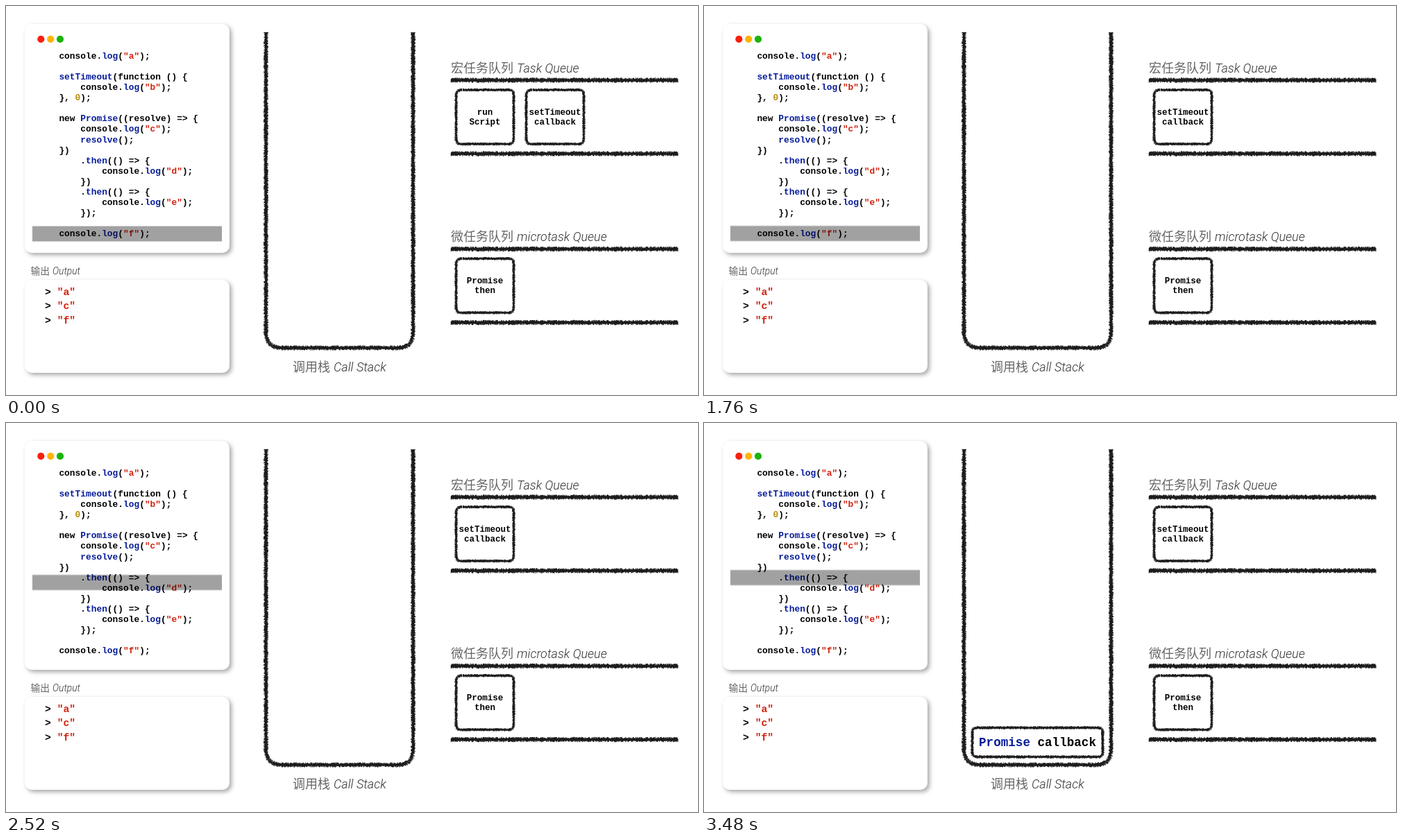
Recreate the animation shown at these times as an HTML page. Size 997 px wide and 561 px high, loop 3960 ms.

```html
<!DOCTYPE html>
<html lang="zh-CN">
<head>
<meta charset="utf-8">
<title>Event loop</title>
<style>
  html, body { margin: 0; width: 100%; height: 100%; overflow: hidden; background: #fff; }
  .stage { position: relative; width: 997px; height: 561px; overflow: hidden; }
  svg { position: absolute; left: 0; top: 0; }

  .panel {
    position: absolute; left: 27px; width: 295px; border-radius: 10px; background: #fff;
    box-shadow: 3px 3px 6px rgba(0, 0, 0, .35);
  }
  .code { top: 26px; height: 330px; }
  .output { top: 395px; height: 134px; }

  pre, .mono { font-family: "Liberation Mono", "Courier New", monospace; font-weight: 700; }
  pre { position: absolute; margin: 0; color: #000; }
  .code pre { left: 49.4px; top: 39px; font-size: 12.87px; line-height: 15.06px; }
  .output pre { left: 29px; top: 7.5px; font-size: 14.7px; line-height: 20.8px; }
  b { color: #061c98; }
  i { color: #d3200b; font-style: normal; }
  u { color: #b68d0c; text-decoration: none; }

  .mono { font-size: 12.5px; text-anchor: middle; }
  .call { font-size: 17.6px; }
  .call tspan { fill: #061c98; }
  .label { font: 300 18px "Noto Sans CJK SC", "Noto Sans CJK", sans-serif; fill: #666; }
  .label tspan { font-family: Roboto, "Liberation Sans", sans-serif; font-style: italic; fill: #333; }
  .label.small { font-size: 13.8px; }
  .rough { fill: none; stroke: #000; stroke-width: .9; }

  /* Paused: the script sets the time of every animation. */
  .run { animation: leave 490ms ease-in 480ms both paused; }
  .timer { animation: advance 490ms cubic-bezier(.37, 0, .63, 1) 480ms both paused; }
  .cursor { animation: climb 960ms cubic-bezier(.37, 0, .63, 1) 1720ms both paused; }
  .frame { animation: drop 500ms ease-out 2980ms both paused; }
  @keyframes leave { to { transform: translateX(-735px); } }
  @keyframes advance { from { transform: translateX(101px); } }
  @keyframes climb { to { transform: translateY(-105.5px); } }
  @keyframes drop { from { transform: translateY(-490px); } }
</style>
</head>
<body>
<div class="stage">
  <div class="panel code"><pre>console.<b>log</b>(<i>"a"</i>);

<b>setTimeout</b>(function () {
    console.<b>log</b>(<i>"b"</i>);
}, <u>0</u>);

new <b>Promise</b>((resolve) =&gt; {
    console.<b>log</b>(<i>"c"</i>);
    <b>resolve</b>();
})
    .<b>then</b>(() =&gt; {
        console.<b>log</b>(<i>"d"</i>);
    })
    .<b>then</b>(() =&gt; {
        console.<b>log</b>(<i>"e"</i>);
    });

console.<b>log</b>(<i>"f"</i>);</pre></div>
  <div class="panel output"><pre>&gt; <i>"a"</i>
&gt; <i>"c"</i>
&gt; <i>"f"</i></pre></div>

  <svg width="997" height="561" viewBox="0 0 997 561">
    <defs>
      <path id="rail" class="rough" data-width="5.4" d="M641 0H968.5"/>
      <path id="tile" class="rough" data-width="3.4" d="M658 121H725Q731.5 121 731.5 128V192Q731.5 199 725 199H655Q648.5 199 648.5 192V128Q648.5 121 657 121"/>
    </defs>

    <circle cx="50.3" cy="47.8" r="5.1" fill="#f7200e"/>
    <circle cx="64.2" cy="47.8" r="5.1" fill="#ffb400"/>
    <circle cx="78" cy="47.8" r="5.1" fill="#1bb40a"/>
    <rect class="cursor" x="38" y="317.5" width="273" height="22" fill-opacity=".37"/>

    <text class="label small" x="35.5" y="387.3">输出<tspan x="67">Output</tspan></text>
    <text class="label" x="413" y="526.7">调用栈<tspan x="472">Call Stack</tspan></text>
    <text class="label" x="641" y="95.5">宏任务队列<tspan x="736">Task Queue</tspan></text>
    <text class="label" x="641" y="339">微任务队列<tspan x="736">microtask Queue</tspan></text>

    <path class="rough" data-width="5.2" d="M374.5 38V470Q374.5 493 397 493H564Q586.5 493 586.5 470V38"/>
    <use href="#rail" y="107"/>
    <use href="#rail" y="213"/>
    <use href="#rail" y="350.5"/>
    <use href="#rail" y="456.5"/>

    <g class="mono">
      <use href="#tile" y="243.3"/>
      <text x="690" y="400.3">Promise</text><text x="690" y="414.3">then</text>
    </g>
    <g class="mono timer">
      <use href="#tile"/>
      <text x="690" y="157">setTimeout</text><text x="690" y="171">callback</text>
    </g>
    <g class="mono run">
      <use href="#tile"/>
      <text x="690" y="157">run</text><text x="690" y="171">Script</text>
    </g>
    <g class="mono call frame">
      <path class="rough" data-width="3.6" d="M393 439.5H568Q574.5 439.5 574.5 446V475Q574.5 481.5 568 481.5H393Q386.5 481.5 386.5 475V446Q386.5 439.5 392.5 439.5"/>
      <text x="480.5" y="466"><tspan>Promise</tspan> callback</text>
    </g>
  </svg>
</div>
<script>
  const LOOP = 3960, STEP = 40;

  let seed = 7;
  const random = () => (seed = seed * 16807 % 2147483647) / 2147483647;

  // Replaces a smooth path by many short bars across it, uneven at both ends.
  function roughen(path) {
    const width = +path.dataset.width, length = path.getTotalLength();
    const bars = [];
    for (let at = 0; at < length; at += .65) {
      const a = path.getPointAtLength(Math.max(0, at - .5));
      const b = path.getPointAtLength(Math.min(length, at + .5));
      const size = Math.hypot(b.x - a.x, b.y - a.y) || 1;
      const nx = (a.y - b.y) / size, ny = (b.x - a.x) / size;
      const reach = () => width * (.25 + .45 * random());
      const point = d => `${((a.x + b.x) / 2 + nx * d).toFixed(2)} ${((a.y + b.y) / 2 + ny * d).toFixed(2)}`;
      bars.push(`M${point(-reach())}L${point(reach())}`);
    }
    path.setAttribute("d", bars.join(""));
  }
  document.querySelectorAll(".rough").forEach(roughen);

  const animations = document.getAnimations();
  function draw() {
    const time = Math.floor((performance.now() + .5) % LOOP / STEP) * STEP;
    for (const animation of animations) animation.currentTime = time;
    requestAnimationFrame(draw);
  }
  draw();
</script>
</body>
</html>
```
